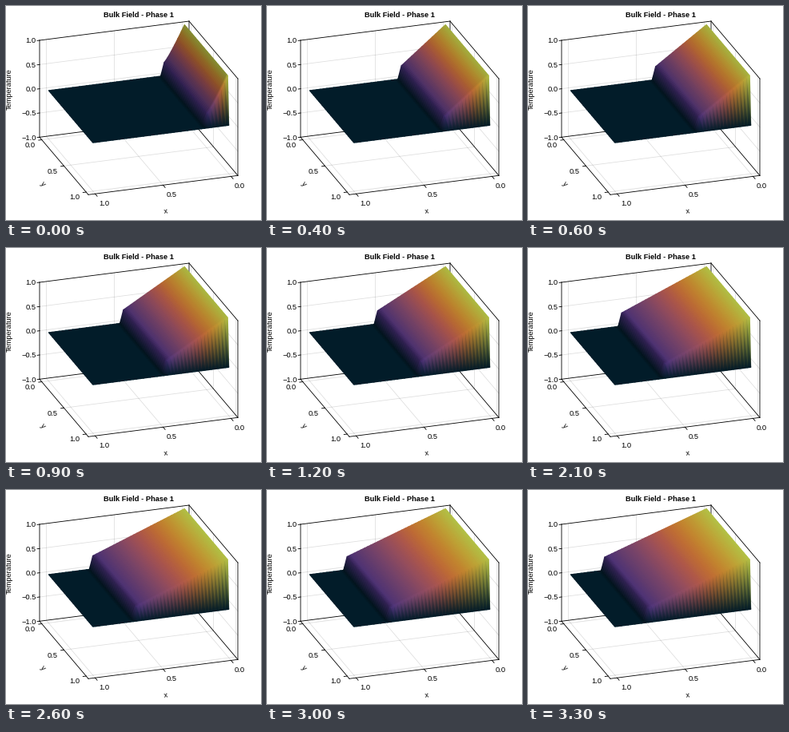
These frames come from a looping animation (319 by 268 pixels, 3.4 s). A matplotlib script:

```python
import numpy as np
import matplotlib.pyplot as plt
from matplotlib.animation import FuncAnimation
from matplotlib.collections import TriMesh
from matplotlib.colors import LinearSegmentedColormap
from matplotlib.tri import Triangulation

W, H, DPI = 319, 268, 64
PX = 72 / DPI          # points per pixel
FRAMES, STEP = 34, 100
CELLS = 40
T_FRONT = 0.27         # temperature at the moving front

plt.rcParams["font.family"] = "Liberation Sans"
plt.rcParams["font.size"] = 9.3 * PX

thermal = LinearSegmentedColormap.from_list("thermal", np.array([
    (3, 35, 51), (13, 48, 100), (53, 50, 155), (93, 62, 153),
    (126, 77, 143), (158, 89, 135), (193, 100, 121), (225, 113, 97),
    (246, 139, 69), (251, 173, 60), (246, 211, 70), (231, 250, 90)]) / 255)

# Orthographic box: corner plus one screen vector per edge
ORIGIN = np.array([42.0, 164.3])
EU, EV, EW = np.array([187, -24]), np.array([61, 72]), np.array([0, -121.3])


def box(u, v, w):
    u, v, w = (np.asarray(a, float)[..., None] for a in (u, v, w))
    return ORIGIN + u * EU + v * EV + w * EW


def frac_x(x):
    return (1.05 - x) / 1.1


def frac_y(y):
    return (y + 0.05) / 1.1


def frac_z(z):
    return (z + 1) / 2


fig = plt.figure(figsize=(W / DPI, H / DPI), dpi=DPI, facecolor="white")
ax = fig.add_axes([0, 0, 1, 1])
ax.set_xlim(0, W)
ax.set_ylim(H, 0)
ax.axis("off")


def line(p, q, color="black", width=0.85, z=2):
    ax.plot([p[0], q[0]], [p[1], q[1]], color=color, lw=width * PX, zorder=z,
            solid_capstyle="projecting", snap=False)


def edge(a, b, **kw):
    line(box(*a), box(*b), **kw)


def label(x, y, s, **kw):
    ax.text(x, y, s, **{"ha": "center", "va": "center", "zorder": 5, **kw})


def draw_axes():
    grid = dict(color=(0, 0, 0, 0.13), width=0.8, z=1)
    ticks = (0, 0.5, 1)
    for t in ticks:
        u, v = frac_x(t), frac_y(t)
        edge((u, 0, 0), (u, 1, 0), **grid)
        edge((u, 0, 0), (u, 0, 1), **grid)
        edge((0, v, 0), (1, v, 0), **grid)
        edge((1, v, 0), (1, v, 1), **grid)
    for w in (0.25, 0.5, 0.75):
        edge((0, 0, w), (1, 0, w), **grid)
        edge((1, 0, w), (1, 1, w), **grid)

    floor = [(0, 0), (0, 1), (1, 1), (1, 0)]
    for a, b in zip(floor, floor[1:] + floor[:1]):
        edge((*a, 0), (*b, 0))
    for a in ((0, 0), (1, 0), (1, 1)):
        edge((*a, 0), (*a, 1))
    edge((0, 0, 1), (1, 0, 1))
    edge((1, 0, 1), (1, 1, 1))

    along_u = -EU / np.hypot(*EU)
    along_v = EV / np.hypot(*EV)
    for t in ticks:
        p = box(frac_x(t), 1, 0)
        line(p, p + 4 * along_v)
        label(p[0] + 11, p[1] + 11.9, f"{t:.1f}")
        p = box(0, frac_y(t), 0)
        line(p, p + 4 * along_u)
        label(p[0] - 8, p[1] + 6.8, f"{t:.1f}", ha="right")
    for t in np.linspace(-1, 1, 5):
        p = box(0, 0, frac_z(t))
        line(p, p + 3 * along_u)
        label(p[0] - 4.2, p[1] + 0.9, f"{t:.1f}".replace("-", "\u2212"), ha="right")

    label(165.5, 11.5, "Bulk Field - Phase 1", weight="bold")
    label(4.8, 104, "Temperature", rotation=90)
    label(46, 222.5, "y", rotation=-50)
    label(200, 257, "x", rotation=7.3)


nodes = np.linspace(0, 1, CELLS + 1)
X, Y = np.meshgrid(nodes, nodes)
LIGHT = np.array([-0.1, 0.6, 0.8])

# Two triangles per cell, listed from back to front
ids = np.arange(X.size).reshape(X.shape)
a, b, c, d = ids[:-1, :-1], ids[:-1, 1:], ids[1:, :-1], ids[1:, 1:]
TRIANGLES = np.stack([a, b, c, c, b, d], axis=-1).reshape(-1, 3)


def field(k):
    """Linear fall from the hot wall to the front; the near edge stays cold."""
    front = int(np.ceil(7 * (k + 1) ** 0.42)) - 1
    i = np.arange(CELLS + 1)
    q = np.clip(i / front, 0, 1)
    bend = 1 + 0.15 * np.exp(-k)
    profile = np.where(i <= front, T_FRONT + (1 - T_FRONT) * (1 - q) ** bend, 0)
    T = np.tile(profile, (CELLS + 1, 1))
    T[-1] = 0
    return T


def shade(T):
    dy, dx = np.gradient(T * 0.366, 1 / CELLS)
    n = np.stack([-dx, -dy, np.ones_like(T)], axis=-1)
    n /= np.linalg.norm(n, axis=-1, keepdims=True)
    return 0.45 + 0.45 * np.clip(n @ LIGHT, 0, 1)


surface = []


def update(k):
    while surface:
        surface.pop().remove()
    T = field(k)
    rgb = thermal(T)[..., :3] * shade(T)[..., None]
    pts = box(frac_x(X), frac_y(Y), frac_z(T)).reshape(-1, 2)
    mesh = TriMesh(Triangulation(*pts.T, TRIANGLES), zorder=3)
    mesh.set_facecolor(rgb.reshape(-1, 3))
    surface.append(ax.add_collection(mesh, autolim=False))
    return surface


draw_axes()
anim = FuncAnimation(fig, update, frames=FRAMES, init_func=lambda: update(0),
                     interval=STEP, repeat=True, repeat_delay=0, blit=False)
plt.show()
```
